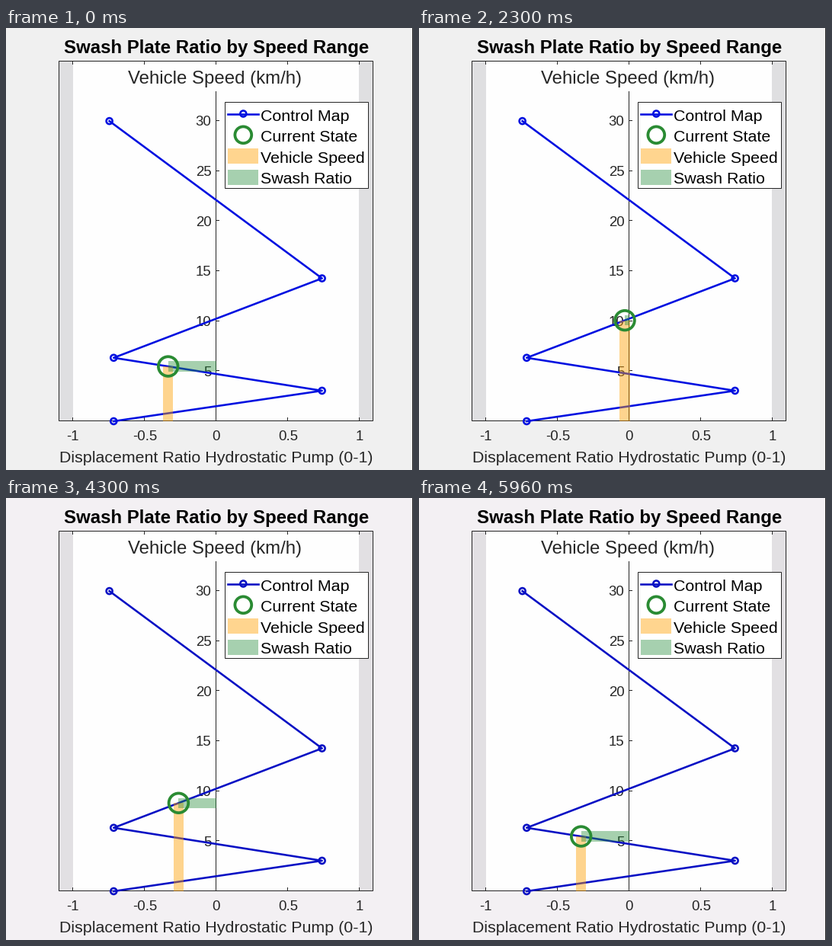
A matplotlib script for the animation above (6 s loop, 534 by 580 pixels).

```python
import numpy as np
import matplotlib.pyplot as plt
from matplotlib.animation import FuncAnimation
from matplotlib.patches import Circle, Rectangle

W, H, DPI = 534, 580, 72      # at 72 dpi one point is one pixel
FRAMES, LOOP = 300, 6000
STEPS = 180                   # the state moves 30 times a second
INK = "#262626"
GREEN = "#2a8b33"
ORANGE_BAR = dict(color="#ffa000", alpha=0.44, lw=0)
GREEN_BAR = dict(color="#228b38", alpha=0.4, lw=0)
BAR = 13.3
X0, Y0 = 275.5, 516           # where ratio and speed are zero

# Control map: speed and displacement ratio at its corners
SPEED = [0, 3.05, 6.34, 14.28, 30]
RATIO = [-0.714, 0.74, -0.714, 0.74, -0.744]

# Stage, side bands and map line, for the way up and the way down
TONES = [("#f0f0f0", "#dfdfe1", "#0010e0"),
         ("#f3f0f3", "#e2e0e3", "#0810c4")]

plt.rcParams["font.family"] = "Liberation Sans"


def px(ratio):
    return X0 + 188 * np.asarray(ratio)


def py(speed):
    return Y0 - 13.13 * np.asarray(speed)


fig = plt.figure(figsize=(W / DPI, H / DPI), dpi=DPI)
ax = fig.add_axes([0, 0, 1, 1])
ax.set(xlim=(0, W), ylim=(H, 0))
ax.axis("off")


def rect(x0, y0, x1, y1, z, **style):
    return ax.add_patch(Rectangle((x0, y0), x1 - x0, y1 - y0, zorder=z, **style))


def line(xs, ys, z=3, color=INK, lw=1):
    return ax.plot(xs, ys, color=color, lw=lw, zorder=z)[0]


def label(x, y, s, size, z=4, color=INK, ha="center", **style):
    ax.text(x, y, s, size=size, color=color, ha=ha, va="baseline", zorder=z, **style)


def ring(x, y, size, z, lw=3.8, color=GREEN):
    return ax.add_patch(Circle((x, y), size / 2, fc="none", ec=color, lw=lw, zorder=z))


# Plot area; one-pixel lines are given by pixel column and row
rect(70, 44, 481, 515, 1, fc="#fefefe", lw=0)
bands = [rect(70, 44, 88, 515, 2, lw=0), rect(463, 44, 481, 515, 2, lw=0)]
rect(69, 43, 481, 515, 3, fc="none", ec=INK, lw=1)
line([275, 275], [83, 515])
for r in (-1, -0.5, 0, 0.5, 1):
    line([px(r) - 0.5] * 2, [515, 511])
    line([px(r) - 0.5] * 2, [43, 47])
    label(px(r) + 0.3, 541, f"{r:g}", 18.67)
for v in range(5, 31, 5):
    line([275, 279], [py(v) - 1] * 2)
    label(269.5, py(v) + 6.2, str(v), 18.67, ha="right")

label(275.7, 33, "Swash Plate Ratio by Speed Range", 24, color="black", weight="bold")
label(273.5, 73.5, "Vehicle Speed (km/h)", 24)
label(276, 570, "Displacement Ratio Hydrostatic Pump (0-1)", 21.33)

curves = [line(px(RATIO), py(SPEED), 5, lw=2.6)]
dots = [ring(x, y, 8, 5, lw=2.6) for x, y in zip(px(RATIO), py(SPEED))]

# Legend
rect(287, 97, 475, 210, 8, fc="white", ec=INK, lw=1)
names = ["Control Map", "Current State", "Vehicle Speed", "Swash Ratio"]
for y, name in zip((122, 149, 177, 204), names):
    label(334, y, name, 21.33, z=9, color="black", ha="left")
curves.append(line([291, 331], [112.5, 112.5], 9, lw=2.6))
dots.append(ring(311.3, 112.5, 8, 9, lw=2.6))
ring(311.3, 140.3, 21.8, 9)
rect(291, 158, 331, 178, 9, **ORANGE_BAR)
rect(291, 185.5, 331, 206, 9, **GREEN_BAR)

# Moving parts
speed_bar = rect(0, 0, BAR, BAR, 6, **ORANGE_BAR)
ratio_bar = rect(0, 0, BAR, BAR, 6.1, **GREEN_BAR)
state = ring(0, 0, 25.6, 7)

rect(533, 0, 534, 580, 10, fc="#202020", lw=0)


def draw(i):
    k = (3 * i + 1) // 5
    stage, band, blue = TONES[k >= STEPS // 2]
    fig.set_facecolor(stage)
    for b in bands:
        b.set_facecolor(band)
    for c in curves:
        c.set_color(blue)
    for d in dots:
        d.set_edgecolor(blue)

    # Speed climbs evenly, then runs back the same way
    speed = 5.48 + min(k, STEPS - 1 - k) / 15
    x, y = px(np.interp(speed, SPEED, RATIO)), py(speed)
    state.center = x, y
    speed_bar.set_bounds(x - BAR / 2, y, BAR, Y0 - y)
    ratio_bar.set_bounds(min(x, X0), y - BAR / 2, abs(x - X0), BAR)


anim = FuncAnimation(fig, draw, frames=FRAMES, init_func=lambda: draw(0),
                     interval=LOOP // FRAMES, repeat=True, repeat_delay=0)
plt.show()
```
